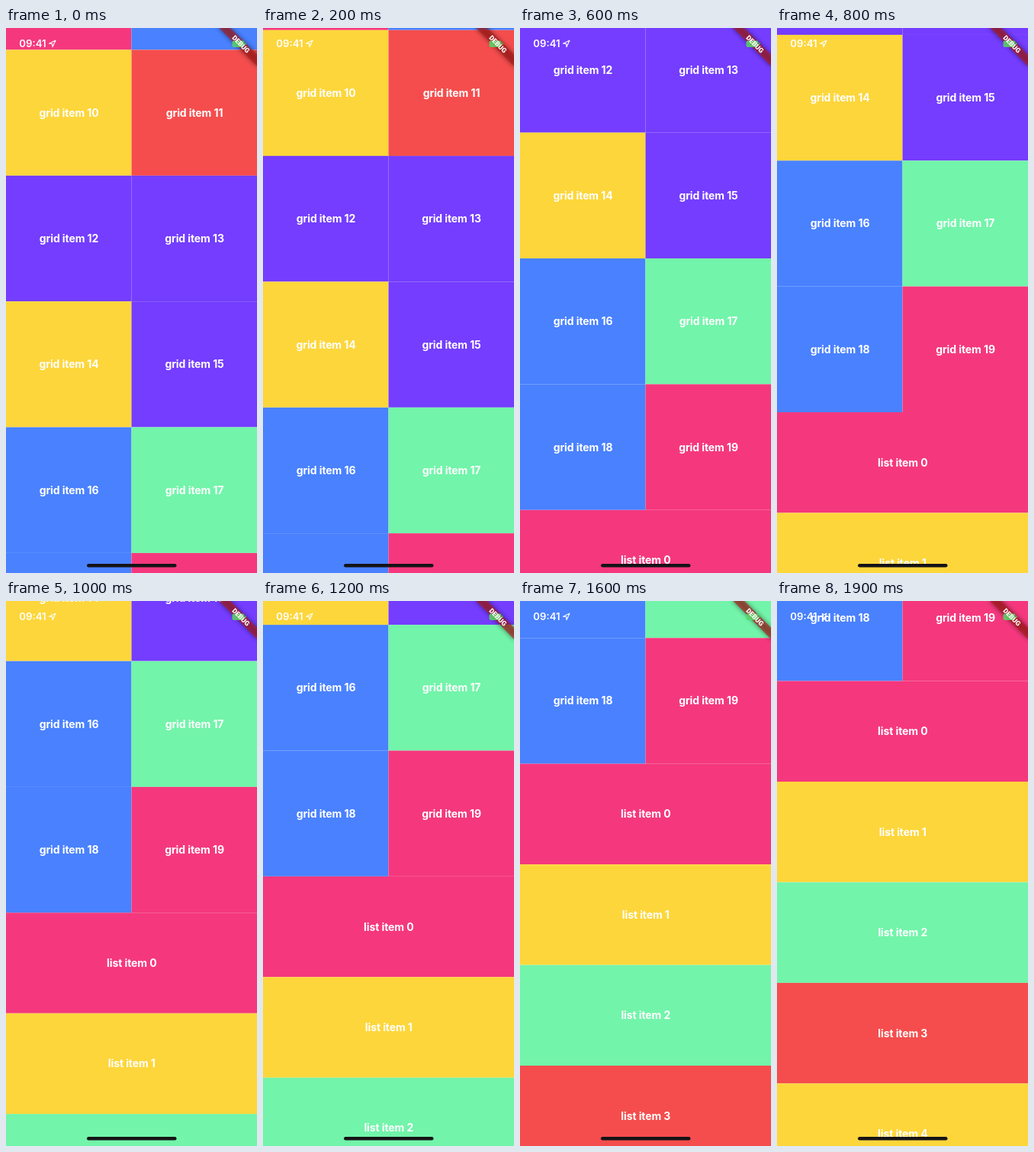
An HTML page for the animation above (2000 ms loop, 329 by 712 pixels).

```html
<!DOCTYPE html>
<html lang="en">
<head>
<meta charset="utf-8">
<title>Scrolling grid and list</title>
<style>
  html, body { margin: 0; width: 100%; height: 100%; overflow: hidden; background: #fff; }
  svg { display: block; width: 329px; height: 712px; }
  text { font-family: Inter, sans-serif; fill: #fff; }
  .label { font-size: 14px; font-weight: 700; letter-spacing: -.1px; text-anchor: middle; }
  .clock { font-size: 13.2px; font-weight: 600; }
  .debug { font: 900 8.9px Roboto, sans-serif; text-anchor: middle; }
</style>
</head>
<body>
<svg viewBox="0 0 329 712">
  <defs>
    <filter id="soft" x="-50%" y="-150%" width="200%" height="400%">
      <feGaussianBlur stdDeviation="3.2"/>
    </filter>
  </defs>
  <g id="content"></g>

  <g transform="translate(329 0) rotate(45)">
    <rect x="-36" y="24.6" width="72" height="10.5" opacity=".5" filter="url(#soft)"/>
    <rect x="-36" y="24.6" width="72" height="10.5" fill="#b71c1c" fill-opacity=".63"/>
  </g>
  <g fill="#58d765">
    <rect x="296.5" y="16.5" width="16" height="8.5" rx="2.2" opacity=".85"/>
    <rect x="313.2" y="19.2" width="1.2" height="3" rx=".6"/>
  </g>
  <text class="debug" transform="translate(329 0) rotate(45)" x="0" y="33">DEBUG</text>

  <text class="clock" x="17.3" y="25">09:41</text>
  <path d="M65 16.3 L56.6 20.3 L60.7 20.6 L61 24.7 Z" fill="none" stroke="#fff" stroke-width="1.1" stroke-linejoin="round"/>
  <rect x="106" y="700" width="117.5" height="4.6" rx="2.3" fill="#151316"/>
</svg>

<script>
const WIDTH = 329, CELL = 164.35, ROW = 131.45, LOOP = 2000, TICK = 100;
const FIRST_ITEM = 8, GRID_TOP = 28.5 - CELL, LIST_TOP = GRID_TOP + 6 * CELL;
const pink = '#f5387d', yellow = '#fdd63b', red = '#f54d4d',
      purple = '#743dff', blue = '#4981ff', green = '#72f4aa';
const gridColors = [pink, blue, yellow, red, purple, purple,
                    yellow, purple, blue, green, blue, pink];
const listColors = [pink, yellow, green, red, yellow];

// Scroll keys: tick, distance, speed per tick
const keys = [[0, 0, 6], [4, 97.5, 52], [6, 220.5, 67], [10, 443, 34],
              [14, 545.8, 42], [16, 637.6, 44], [19, 745.7, 28]];

const content = document.getElementById('content');

function add(tag, attributes, text = '') {
  const node = document.createElementNS(content.namespaceURI, tag);
  for (const name in attributes) node.setAttribute(name, attributes[name]);
  node.textContent = text;
  content.append(node);
}

function addTile(x, y, width, height, fill, label) {
  add('rect', { x, y, width, height, fill });
  add('text', { class: 'label', x: x + width / 2 + .3, y: y + height / 2 + 5 }, label);
}

gridColors.forEach((color, i) =>
  addTile(i % 2 * WIDTH / 2, GRID_TOP + Math.floor(i / 2) * CELL,
          WIDTH / 2, CELL, color, `grid item ${FIRST_ITEM + i}`));
listColors.forEach((color, i) =>
  addTile(0, LIST_TOP + i * ROW, WIDTH, ROW, color, `list item ${i}`));

// Cubic Hermite interpolation between the scroll keys
function scrollAt(tick) {
  const next = Math.max(1, keys.findIndex(key => key[0] >= tick));
  const [t0, p0, v0] = keys[next - 1], [t1, p1, v1] = keys[next];
  const span = t1 - t0, u = (tick - t0) / span, w = 1 - u;
  return w * w * ((1 + 2 * u) * p0 + u * span * v0)
       + u * u * ((3 - 2 * u) * p1 - w * span * v1);
}

function draw() {
  const tick = Math.floor(performance.now() % LOOP / TICK);
  content.setAttribute('transform', `translate(0 ${-scrollAt(tick)})`);
  requestAnimationFrame(draw);
}
draw();
</script>
</body>
</html>
```
